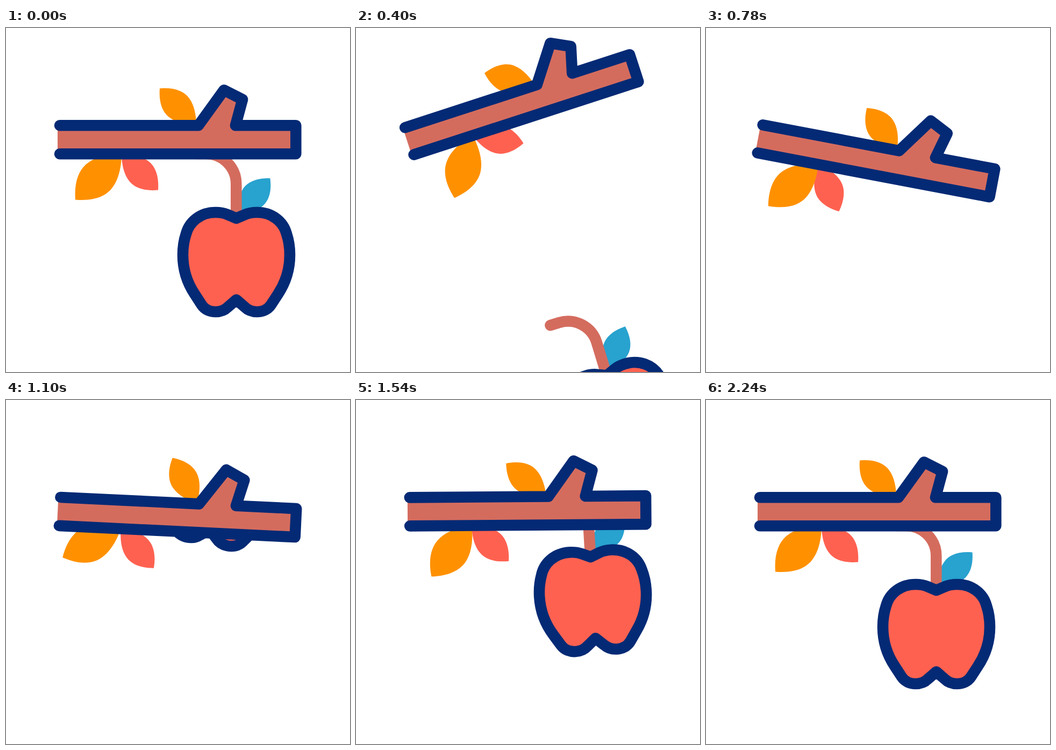
Recreate the animation shown at these times as an HTML page. Size 640 px wide and 640 px high, loop 2400 ms.

```html
<!DOCTYPE html>
<html lang="en">
<head>
<meta charset="utf-8">
<title>Apple branch</title>
<style>
html, body { margin: 0; width: 100%; height: 100%; overflow: hidden; background: #fff; }
svg { display: block; width: 100vw; height: 100vh; }
.line { stroke: #042a75; stroke-width: 20.6; stroke-linecap: round; stroke-linejoin: round; }
.wood { fill: #d46c5e; }
.stem { fill: none; stroke: #d46c5e; stroke-width: 20.6; stroke-linecap: round; }
.orange { fill: #ff9100; }
.red { fill: #ff6150; }
.blue { fill: #28a2cf; }
</style>
</head>
<body>
<svg viewBox="0 0 640 640">
  <defs>
    <path id="leaf" d="M0 0C0 -18 -4 -37 -13 -49C-22 -62 -40 -70 -68 -67.5C-70 -40 -62 -22 -49 -13C-37 -4 -18 0 0 0Z"/>
    <clipPath id="below"><rect x="-400" y="208" width="1500" height="1200"/></clipPath>
  </defs>
  <g id="hang" clip-path="url(#below)">
    <g id="apple">
      <g id="blueLeaf"><use href="#leaf" class="blue" transform="translate(431 347) scale(-.95 .94)"/></g>
      <path class="stem" d="M355 234H372A56 56 0 0 1 428.3 290V350"/>
      <path class="line red" d="M428.5 354L412 347C405 344 398 343 390 343C362 343 341 360 335 383
        C330 398 329 410 329 422C329 448 337 474 351 495L364 515C370 524 380 528 390 528
        C399 528 407 525 413 519L428.5 505.500L444 519C450 525 458 528 467 528
        C477 528 487 524 493 515L506 495C520 474 528 448 528 422C528 410 527 398 522 383
        C516 360 495 343 467 343C459 343 452 344 445 347Z"/>
    </g>
  </g>
  <g id="branch">
    <g id="topLeaf"><use href="#leaf" class="orange" transform="translate(354 180)"/></g>
    <g id="redLeaf"><use href="#leaf" class="red" transform="translate(215 234) scale(-1)"/></g>
    <g id="lowLeaf"><use href="#leaf" class="orange" transform="translate(215 234) scale(1.265 -1.265)"/></g>
    <path class="wood" d="M96 181H358L405.500 115.500L440 133L427 181H539.300V234.300H96Z"/>
    <path class="line" fill="none" d="M100 181.300H358L405.500 115.500L440 133L427 181.300H539.300V234.300H100"/>
  </g>
</svg>
<script>
const LOOP = 2400;
const REGROW = 700;
// Damped swing: [time in ms, degrees]
const SWING = [[0, 0], [400, -18], [910, 15.8], [1270, -8], [1725, 3.7], [2055, 0]];

const $ = id => document.getElementById(id);
const ease = u => (1 - Math.cos(Math.PI * Math.min(1, Math.max(0, u)))) / 2;

function swing(t) {
  for (let i = 1; i < SWING.length; i++) {
    const [t0, a] = SWING[i - 1], [t1, b] = SWING[i];
    if (t < t1) return a + (b - a) * ease((t - t0) / (t1 - t0));
  }
  return 0;
}

function turn(id, deg, x, y, dy = 0) {
  $(id).setAttribute("transform", `translate(0 ${dy}) rotate(${deg} ${x} ${y})`);
}

function draw(t) {
  const falling = t < REGROW;
  const drop = falling ? 318 * (t / 400) ** 1.5 : -325 * (1 - ease((t - 900) / 880));

  turn("branch", swing(t), 108, 211);
  turn("redLeaf", swing(t), 215, 234);
  turn("topLeaf", swing(t - 130), 354, 180);
  turn("lowLeaf", swing(t - 172), 215, 234);

  // The apple drops freely, then grows back attached to the branch
  turn("hang", falling ? 0 : swing(t), 108, 211);
  turn("apple", swing(t - 65), 358, 212, drop);
  turn("blueLeaf", falling ? -3.7 - 3 * t / 400 : 0, 431, 347);
}

const start = performance.now();
function tick() {
  draw((performance.now() - start) % LOOP);
  requestAnimationFrame(tick);
}
tick();
</script>
</body>
</html>
```
